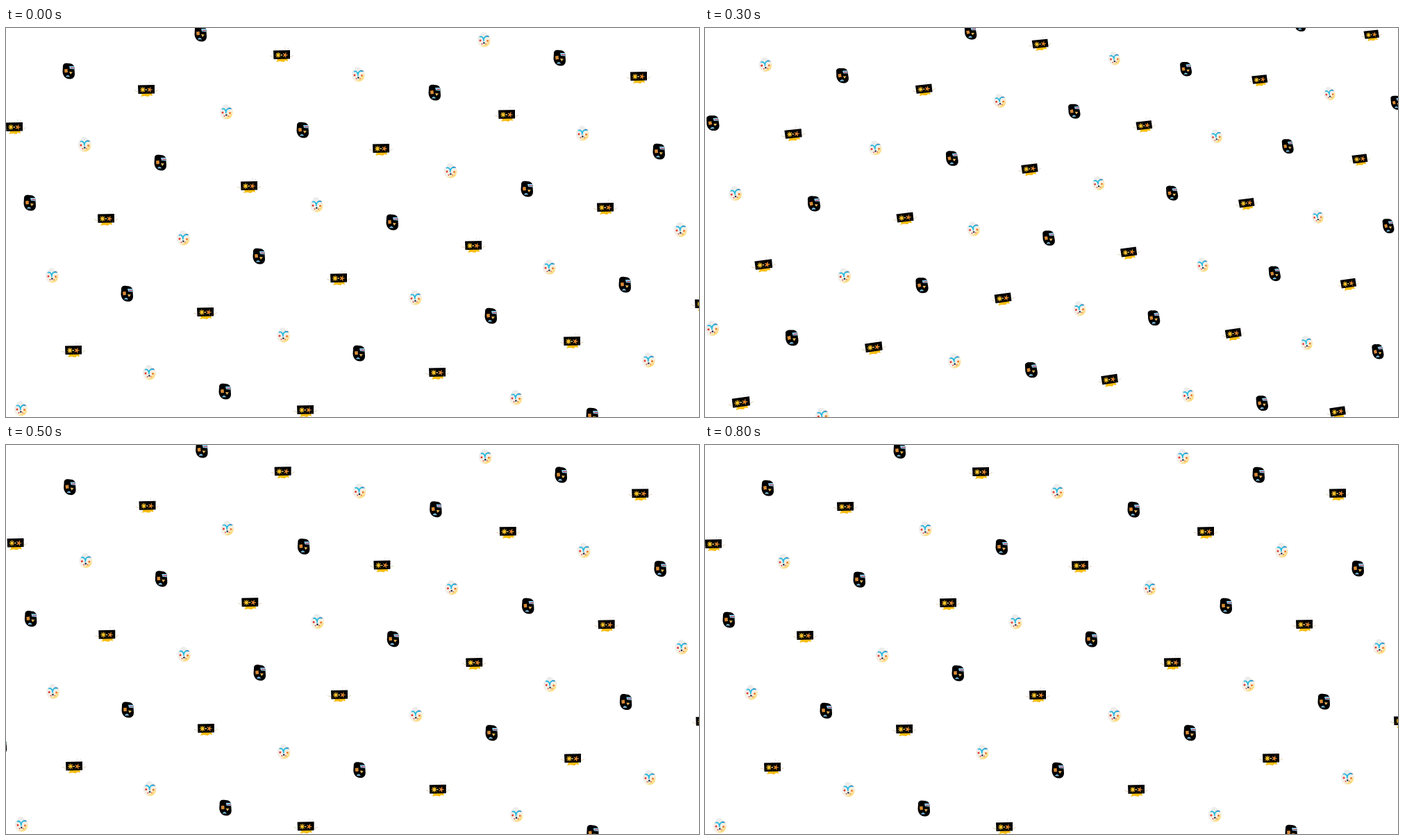
These frames come from a looping animation (998x561 px, 2.3 s). An HTML page with a canvas:

```html
<!DOCTYPE html>
<html lang="en">
<head>
<meta charset="utf-8">
<title>Swinging mask pattern</title>
<style>
html, body { margin: 0; width: 100%; height: 100%; overflow: hidden; background: #fff; }
canvas { display: block; }
</style>
</head>
<body>
<canvas id="stage" width="998" height="561"></canvas>
<script>
const ctx = document.getElementById('stage').getContext('2d');
const CX = 499, CY = 280, UNIT = 100, LOOP = 2300, STEP = 100;

// Resting centres as x, y pairs
const HELMETS = [
  90,62, 427,147, 750,232, 1081,317, 280,8, 617,93, 940,178, 797,43, 475,-42, 1125,126, 988,-12,
  222,194, 556,280, 891,370, 34,252, 364,329, 698,415, 1034,505, 174,383, 508,469, 844,559,
  315,524, -9,436, 130,576];
const BOXES = [
  202,90, 540,175, 863,260, 397,40, 721,126, 1052,210, 911,71, 578,-14, 1102,15,
  12,144, 350,229, 673,315, 1004,399, 144,276, 479,362, 815,453, 287,411, 621,498, 958,587,
  97,466, 431,552];
const EGGS = [
  317,121, 640,206, 971,291, -18,36, 171,-18, 507,67, 830,152, 688,17, 1019,102,
  113,168, 447,255, 782,345, 255,303, 589,389, 925,479, 66,357, 399,443, 734,533,
  206,497, 21,549];

// Plane transforms around the stage centre, in units of 100 px
const REST = [1, 0, 0, 0, 1, 0, 0, 0];
const LEAN = [1.0038, -.0207, .1153, .02266, 1.0034, -.0488, -.00173, .0015];
const SWING = [.9655, .1141, -.5935, -.101, .9653, .2875, .008257, -.00715];
const lean = k => REST.map((r, i) => r + k * (LEAN[i] - r));
const POSES = [REST, lean(.5), LEAN, SWING, lean(-.34), lean(.1), lean(.1), lean(.05), REST];

function project([a, b, c, d, e, f, g, h], px, py) {
  const x = (px - CX) / UNIT, y = (py - CY) / UNIT, w = 1 + g * x + h * y;
  return [CX + UNIT * (a * x + b * y + c) / w, CY + UNIT * (d * x + e * y + f) / w];
}

function fill(color, path) {
  ctx.fillStyle = color;
  ctx.fill(new Path2D(path));
}

function line(color, width, path) {
  ctx.strokeStyle = color;
  ctx.lineWidth = width;
  ctx.stroke(new Path2D(path));
}

function dot(color, x, y, r) {
  ctx.fillStyle = color;
  ctx.beginPath();
  ctx.arc(x, y, r, 0, 2 * Math.PI);
  ctx.fill();
}

function star(color, x, y, r, rays) {
  ctx.strokeStyle = color;
  ctx.lineWidth = 1.1;
  ctx.beginPath();
  for (let i = 0; i < rays; i++) {
    const a = i * 2 * Math.PI / rays;
    ctx.moveTo(x, y);
    ctx.lineTo(x + r * Math.cos(a), y + r * Math.sin(a));
  }
  ctx.stroke();
  dot(color, x, y, 1.7);
}

function helmet() {
  fill('#000', 'M-8-7C-8-11-4-12 0-11C6-11 9-8 8.5-3L9 4C9 9 6 12 1 11.5C-5 11-8 7-8.500 1Z');
  fill('#d98b35', 'M-6-2.500L-1.500-3L-1 2L-5.500 2.500Z');
  fill('#86cdec', 'M1-7L8-7L8.500-2.500L2-3Z');
  line('#d8435a', 1.2, 'M3-4.500L8-4.500');
  fill('#e8b95a', 'M1 1L6 1.500L3 5Z');
  fill('#78b9d9', 'M-4 8.500C-3 5 1 5 2 8.500Z');
}

function box() {
  line('#d9c19a', .7, 'M-12 2L-17 0M12 2L17-.5');
  line('#ccc', .5, 'M5-9L4.500-13M9-9L9.500-12M-8-9L-9-11');
  fill('#f7bd12', 'M-8 4H8L9 8L5 7L3 9L-3 8L-8 9L-6 6Z');
  fill('#000', 'M-12-7.500L12-8L12 4.500L-11.500 5Z');
  star('#ffc62b', -5, -1, 4, 8);
  star('#f79a32', 5, -1, 3.8, 5);
  dot('#ffe08a', 0, -1, .9);
  dot('#e5482d', 5, -1, .7);
  for (const x of [-9.5, 0, 9.5]) dot('#a87422', x, 3, .5);
}

function egg() {
  const skin = ctx.createLinearGradient(-5, -6, 7, 9);
  skin.addColorStop(0, '#ececec');
  skin.addColorStop(.6, '#f6f0e3');
  skin.addColorStop(1, '#ffd04a');
  fill(skin, 'M-5-7C-5-12 3-12 4-8C9-7 10-3 9.500 1C9 7 5 10.500 0 10.500C-6 10.500-9 6-9 1C-9-3-8-6-5-7Z');
  line('#29b9df', 1.8, 'M-6-4C-3-6 0-3 0 2M0 0C0-4 3-6 7-4.500');
  line('#3d6fb5', .8, 'M3-5.500C5-6 7-5.500 8-4');
  dot('#e23a32', -5, 1, 1.5);
  dot('#e8772e', 5.5, 1.5, 1.5);
  dot('#1d2d50', .3, 4.5, 1.3);
  dot('#d9413a', -2.5, 6, .9);
  dot('#d9413a', 3, 6, .8);
}

function scatter(spots, draw, pose) {
  for (let i = 0; i < spots.length; i += 2) {
    const x = spots[i], y = spots[i + 1];
    const [ox, oy] = project(pose, x, y);
    const [rx, ry] = project(pose, x + 1, y);
    const [dx, dy] = project(pose, x, y + 1);
    ctx.setTransform(rx - ox, ry - oy, dx - ox, dy - oy, ox, oy);
    draw();
  }
}

function render(now) {
  const step = Math.floor(now % LOOP / STEP);
  const pose = POSES[Math.min(step, POSES.length - 1)];
  ctx.resetTransform();
  ctx.fillStyle = '#fff';
  ctx.fillRect(0, 0, 998, 561);
  scatter(HELMETS, helmet, pose);
  scatter(BOXES, box, pose);
  scatter(EGGS, egg, pose);
}

const start = performance.now();
function tick() {
  render(performance.now() - start);
  requestAnimationFrame(tick);
}
tick();
</script>
</body>
</html>
```
